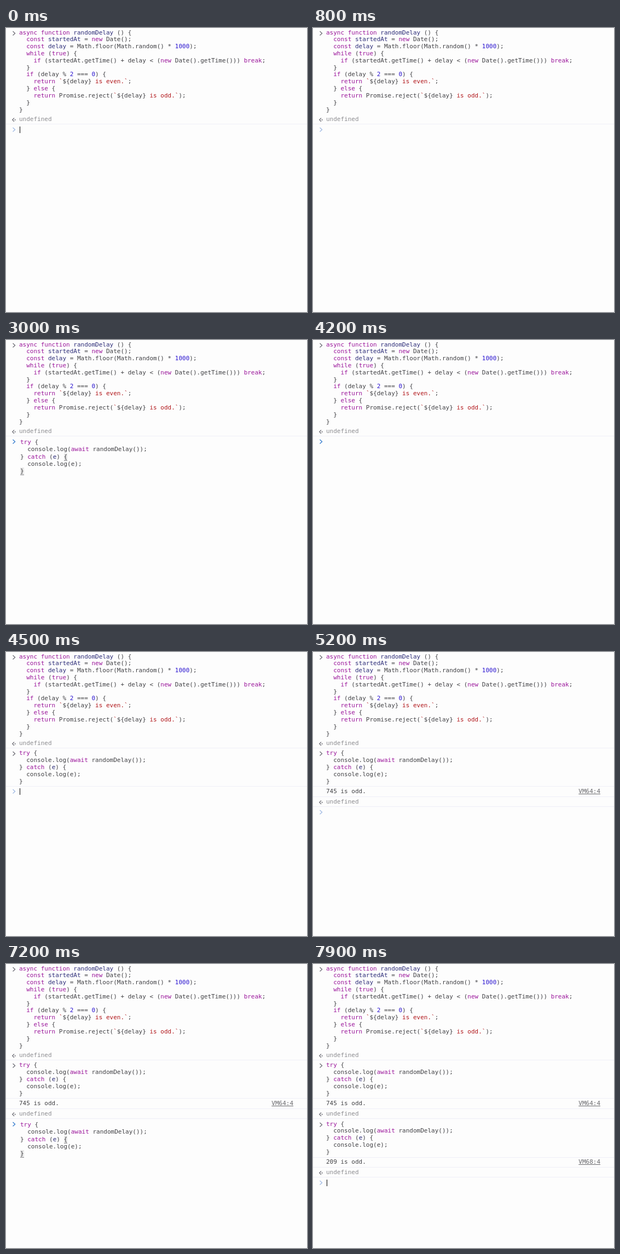
Animation of 550 by 519 pixels, one loop 8 s. Source, as an HTML page:

```html
<!DOCTYPE html>
<html lang="en">
<head>
<meta charset="utf-8">
<title>Console</title>
<style>
html, body { margin: 0; width: 100%; height: 100%; overflow: hidden; background: #fdfdfd; }
pre, svg, hr, i { position: absolute; margin: 0; }
pre { font: 11px/12.82px "DejaVu Sans Mono", monospace; color: #404044; }
svg { left: 10px; width: 10px; height: 13px; overflow: visible; fill: none; stroke: #74747c; stroke-width: 1.4; }
hr { left: 0; width: 100%; height: 1px; border: 0; background: #efeff8; }
i { width: 1px; height: 12px; background: #000; }
.kw { color: #9a149a; }
.def { color: #2c2c78; }
.num { color: #2a14d0; }
.str { color: #b01418; }
.dim { color: #8c8c90; }
.link { color: #68686c; text-decoration: underline; }
.edit { line-height: 13.25px; }
.match { background: #e8e8e8; box-shadow: 0 1px #88888c; }
</style>
</head>
<body>
<script>
const LOOP = 8000, TEXT_X = 24;
const parts = [];

const setup = `async function randomDelay () {
  const startedAt = new Date();
  const delay = Math.floor(Math.random() * 1000);
  while (true) {
    if (startedAt.getTime() + delay < (new Date().getTime())) break;
  }
  if (delay % 2 === 0) {
    return \`\${delay} is even.\`;
  } else {
    return Promise.reject(\`\${delay} is odd.\`);
  }
}`;
const call = `try {
  console.log(await randomDelay());
} catch (e) {
  console.log(e);
}`;

const tokens = /(?<def>(?<=function |const |catch \()\w+)|(?<str>`(?=\$)|(?<=\}) is \w+\.`)|(?<kw>\b(?:async|function|const|new|while|true|if|break|return|else|try|catch|await)\b)|(?<num>\b\d+\b)|</g;

function highlight(code) {
  return code.replace(tokens, (word, ...rest) => {
    const groups = rest.at(-1);
    const kind = Object.keys(groups).find(k => groups[k]);
    return kind ? `<span class="${kind}">${word}</span>` : "&lt;";
  });
}

// Adds an element that is visible between two times.
function add(tag, x, y, html = "", name = "", from = 0, to = LOOP) {
  const el = tag === "svg"
    ? document.createElementNS("http://www.w3.org/2000/svg", tag)
    : document.createElement(tag);
  el.innerHTML = html;
  if (name) el.setAttribute("class", name);
  if (x !== null) el.style.left = x + "px";
  el.style.top = y + "px";
  document.body.append(el);
  parts.push({ el, from, to });
  return el;
}

const CHEVRON = '<path d="M2.5 3L6.5 6.7L2.5 10.4"/>';
const RETURN = '<path d="M5 3.6L1.8 6.8L5 10"/><circle cx="6.6" cy="6.8" r="1.1" fill="#74747c" stroke="none"/>';

function command(y, code, from) {
  add("svg", null, y, CHEVRON, "", from);
  add("pre", TEXT_X, y, highlight(code), "", from);
}

function result(y, from) {
  add("svg", null, y, RETURN, "", from);
  add("pre", TEXT_X, y, "undefined", "dim", from);
  add("hr", null, y + 14, "", "", from);
}

function run(y, output, link, sent, done) {
  command(y, call, sent);
  add("hr", null, y + 66, "", "", sent);
  add("pre", TEXT_X, y + 69.6, output, "", done);
  add("pre", 485.3, y + 69.6, link, "link", done);
  add("hr", null, y + 84.5, "", "", done);
  result(y + 88.7, done);
}

function draft(y, from, to) {
  const code = highlight(call)
    .replace(/\{(?=\n  console.log\(e)/, '<span class="match">{</span>')
    .replace(/\}$/, '<span class="match">}</span>');
  add("pre", 26, y, code, "edit", from, to);
}

command(2.6, setup, 0);
result(161, 0);
run(179.4, "745 is odd.", "VM64:4", 4300, 5200);
run(286.6, "209 is odd.", "VM68:4", 7400, 7600);
draft(180, 2300, 4200);
draft(287, 6300, 7300);

const icon = add("svg", null, 0, CHEVRON);
const caret = add("i", 25, 0);

const promptSteps = [[0, 179], [4300, 248], [5200, 286], [7400, 355], [7600, 393]];
const caretOn = [[0, 450], [1000, 1500], [2050, 2800], [3350, 3850], [4300, 4800],
  [5300, 5800], [6300, 6750], [7600, LOOP]];
const within = (t, [from, to]) => t >= from && t < to;

function frame(now) {
  const t = now % LOOP;
  for (const { el, from, to } of parts) {
    el.style.visibility = within(t, [from, to]) ? "visible" : "hidden";
  }
  const y = promptSteps.findLast(step => t >= step[0])[1];
  const typing = within(t, [2300, 4200]) || within(t, [6300, 7300]);
  const active = within(t, [2300, 4300]) || within(t, [6300, 7400]);
  icon.style.top = y + "px";
  icon.style.stroke = active ? "#3c80d0" : "#a4bce4";
  caret.style.left = (typing ? 33 : 25) + "px";
  caret.style.top = y + 1 + (typing ? 53 : 0) + "px";
  caret.style.visibility = caretOn.some(span => within(t, span)) ? "visible" : "hidden";
  requestAnimationFrame(frame);
}
frame(0);
</script>
</body>
</html>
```
